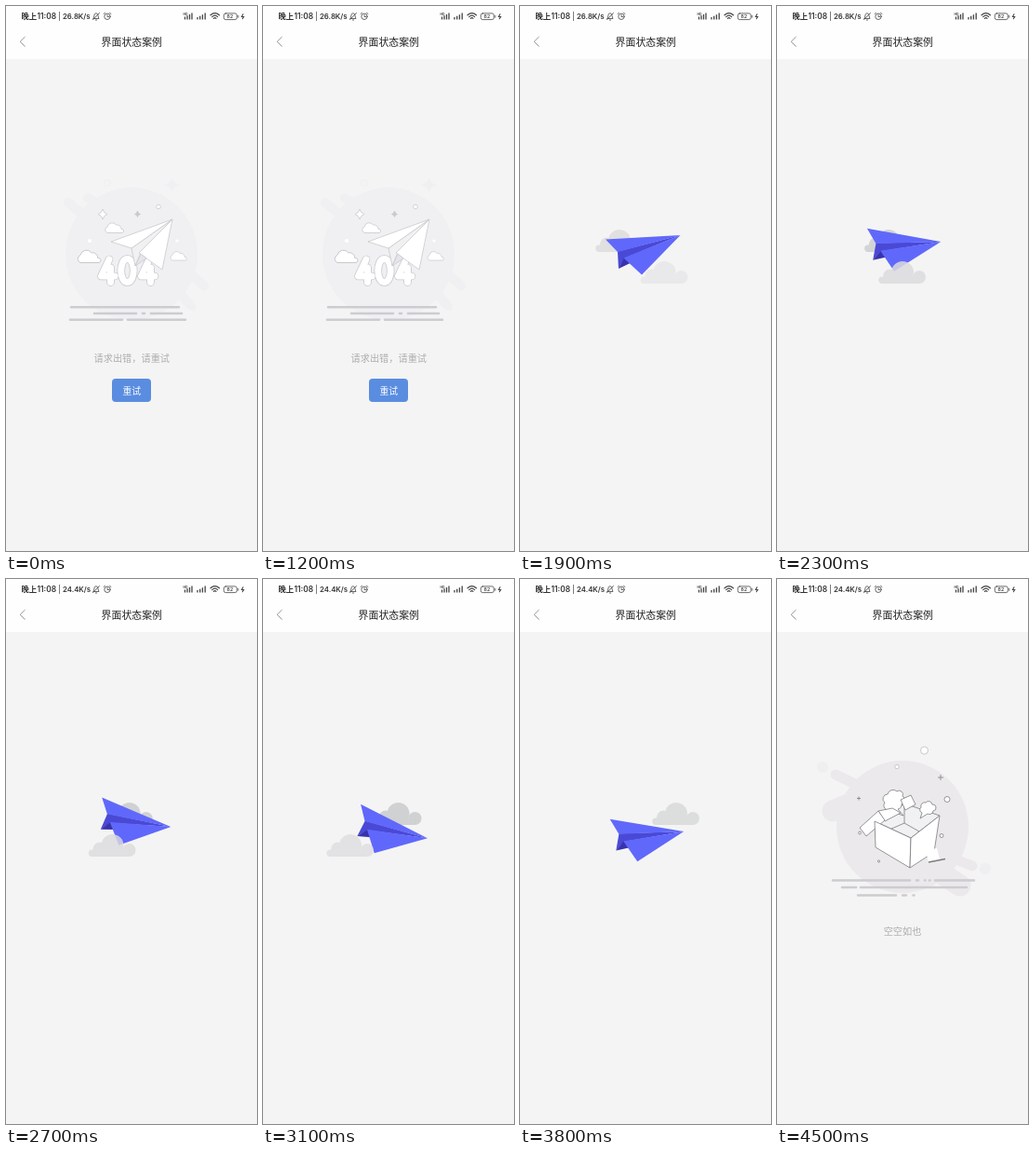
An HTML page for the animation above (4.7 s loop, 270 by 585 pixels).

```html
<!DOCTYPE html>
<html lang="zh-CN">
<head>
<meta charset="utf-8">
<title>界面状态案例</title>
<style>
  html, body { margin: 0; width: 100%; height: 100%; overflow: hidden; background: #f4f4f4; }
  svg { display: block; width: 100vw; height: 100vh; }
  text { font-family: "Noto Sans CJK SC", "Noto Sans CJK", sans-serif; text-anchor: middle; }
  .status text { font-family: Inter, "Noto Sans CJK SC", "Noto Sans CJK", sans-serif; font-size: 8.4px; font-weight: 600; text-anchor: start; fill: #333; }
  .icons { fill: none; stroke: #444; stroke-width: .8; stroke-linecap: round; }
  .note { font-size: 10.2px; fill: #acacac; }
  .ground { stroke: #cdccd0; stroke-width: 2.6; stroke-linecap: round; }
  .shade { fill: #f0eff2; stroke: #f0eff2; stroke-width: 0; stroke-linecap: round; }
  #empty .shade { fill: #ebe9ec; stroke: #ebe9ec; }
  .art { fill: #fff; stroke: #c9c8cc; stroke-width: .8; stroke-linejoin: round; }
  .box { fill: #fff; stroke: #7c7c7f; stroke-width: .8; stroke-linejoin: round; }
</style>
</head>
<body>
<svg viewBox="0 0 270 585" preserveAspectRatio="none">
  <defs>
    <g id="cloud">
      <circle cy="-12" r="12"/><circle cx="18" cy="-7" r="7"/>
      <circle cx="-13.5" cy="-8" r="7.5"/><circle cx="-22" cy="-3.7" r="3.7"/>
      <rect x="-22" y="-7" width="40" height="7"/>
    </g>
    <path id="puff" d="M-8 4a3.5 3.5 0 0 1 0-6.500a5.300 5.300 0 0 1 9.500-2a4.500 4.500 0 0 1 5.500 4.500a2 2 0 0 1 1 4z"/>
    <path id="digits" d="M111 272L102.500 290H117M112.500 281V296.500M154 272L145.500 290H160M155.500 281V296.500M130.500 271.500c-9 0-9 25 0 25s9-25 0-25z"
      fill="none" stroke-linecap="round" stroke-linejoin="round"/>
  </defs>

  <g id="error">
    <g class="shade">
      <circle cx="135" cy="266" r="71"/>
      <path d="M67 211L88 228M88 206L110 219M190 280L213 300M182 302L197 320" stroke-width="10"/>
      <path d="M178.500 184q1.500 6.500 9 8q-7.500 1.500-9 8q-1.500-6.500-9-8q7.500-1.500 9-8z"/>
      <circle cx="200" cy="323" r="4"/>
      <circle cx="109" cy="190" r="3.500" fill="none" stroke-width="1"/>
    </g>
    <g class="art">
      <path d="M104 218q1 4.500 5 5.500q-4 1-5 5.500q-1-4.500-5-5.500q4-1 5-5.500z"/>
      <path d="M141.500 220q.5 3 3 3.500q-2.500.5-3 3q-.5-2.500-3-3q2.500-.5 3-3.500z" fill="#c9c8cc"/>
      <circle cx="164" cy="215.500" r="2.300"/>
      <circle cx="90" cy="252" r="2" stroke="none"/>
      <circle cx="184" cy="252" r="1.500" stroke="none"/>
      <use href="#puff" x="117" y="239.500"/>
      <use href="#puff" transform="translate(90 270.500) scale(1.250)"/>
      <use href="#puff" transform="translate(186 269.500) scale(.88)"/>
      <use href="#digits" stroke="#c9c8cc" stroke-width="8.600"/>
      <use href="#digits" stroke="#fff" stroke-width="7"/>
      <path d="M179 229L135 260L139 279L145 265Z" fill="#f1f0f3"/>
      <path d="M179 229L113 253L135 260Z"/>
      <path d="M179 229L143 265L168 283Z"/>
      <path d="M145 266L139 279L151 271Z" fill="#e6e5e9"/>
    </g>
    <path class="ground" d="M70 323.300H186M95 330H140M147 330H149M156 330H189M69 336.800H125M131 336.800H193"/>
    <text class="note" x="135.300" y="382">请求出错，请重试</text>
    <rect x="114" y="400" width="42" height="25" rx="4" fill="#5a8de0"/>
    <text x="135.300" y="416.600" font-size="9.800" font-weight="500" fill="#fff">重试</text>
  </g>

  <g id="loading">
    <use id="back" href="#cloud" fill="#d0d1d2"/>
    <g id="plane">
      <path d="M105 263.500L172.500 246L112 271L106 282Z" fill="#4a49d6"/>
      <path d="M106 282L112 270L119.500 275.500Z" fill="#3932ad"/>
      <path d="M92 250.500L172.500 246L105 264Z" fill="#6068fb"/>
      <path d="M111.500 270.500L172.500 246L131 288.500Z" fill="#6068fb"/>
    </g>
    <use id="front" href="#cloud" fill="#dcdbde"/>
  </g>

  <g id="empty">
    <g class="shade">
      <circle cx="135" cy="266" r="71"/>
      <circle cx="49" cy="202" r="6" opacity=".6"/>
      <circle cx="224" cy="311" r="6" opacity=".6"/>
      <path d="M63 210L96 226M190 300L210 308" stroke-width="11"/>
      <path d="M60 249L82 240M180 318L197 329" stroke-width="23"/>
    </g>
    <path class="ground" d="M60 323.500H143M150 323.500H152M159 323.500H159.500M164 323.500H164.500M170 323.500H212M70 331H85M90 331H204M87 339.500H128M135 339.500H139M146.500 339.500H147.500"/>
    <g class="box">
      <path d="M105 260L137 241L175 254L144 278Z" fill="#f1f0f2"/>
      <path d="M137 241V262L121 269M137 262L153 271" fill="none"/>
      <path d="M119 248a5 5 0 0 1-3-8a5 5 0 0 1 3-9a6 6 0 0 1 10-3a4 4 0 0 1 6 5a5 5 0 0 1-1 9a5 5 0 0 1-4 5l6 7z"/>
      <path d="M154 257l2-6a3.500 3.500 0 0 1-1-6a4 4 0 0 1 5-5a4 4 0 0 1 7 2a3.500 3.500 0 0 1 1 7a4 4 0 0 1-6 3z"/>
      <path d="M133 237L144 232L149 242L138 248Z"/>
      <path d="M109 249L124 246L133 251L116 260Z"/>
      <path d="M89 267L109 249L116 259L96 276Z"/>
      <path d="M105 260L144 278L143 310L106 288Z"/>
      <path d="M144 278L175 254L169 293L143 310Z"/>
      <path d="M160 291L172 289L175 301L163 304Z" stroke="none"/>
      <path d="M163 304L181 300.500" stroke-width="1.300"/>
      <path d="M176 210V216M173 213H179M88 233.500V237.500M86 235.500H90"/>
      <circle cx="183" cy="236.500" r="3"/>
      <circle cx="177" cy="275.500" r="2"/>
      <circle cx="89" cy="272.500" r="1.400"/>
      <circle cx="109.500" cy="303" r="1.100"/>
      <g stroke="#bbb"><circle cx="158.500" cy="184" r="4"/><circle cx="129" cy="201.500" r="2.200"/></g>
    </g>
    <text class="note" x="135" y="382">空空如也</text>
  </g>

  <rect width="270" height="57" fill="#fefefe"/>
  <g class="status">
    <text x="16.500" y="14.300">晚上</text>
    <text x="33.500" y="14.300">11:08</text>
    <text x="56" y="13.600" style="font-weight:400">|</text>
    <text id="speed" x="61" y="14.300" style="font-size:7.800px"></text>
    <g class="icons">
      <path d="M94 13.500H100C98.700 12 99.700 8 97 7.800S95.300 12 94 13.500M96.300 15H97.700M93.500 14.700L100.500 7.500"/>
      <circle cx="109" cy="11.300" r="3.200"/>
      <path d="M109 9.700V11.500H110.500M105 8.500L106.500 7.300M113 8.500L111.500 7.300"/>
      <path d="M192.500 14.500V11.500M195 14.500V10.300M197.500 14.500V9M200 14.500V7.500M206 14.500V12M208.700 14.500V10.700M211.400 14.500V9.200M214.200 14.500V7.500" stroke-width="1.300" stroke-linecap="butt"/>
      <path d="M220 9.800Q224.700 5.400 229.400 9.800M221.700 11.600Q224.700 8.800 227.700 11.600M223.400 13.400Q224.700 12 226 13.400" stroke-width="1.200"/>
      <rect x="234.300" y="7.900" width="14" height="6.700" rx="2"/>
      <path d="M249.800 10.300V12.300"/>
      <path d="M255 8.800L253.500 11.500H255.700L254.300 13.700" stroke-width="1.100"/>
    </g>
    <text x="190.500" y="9.800" style="font-size:3.500px">HD</text>
    <text x="237.600" y="13.200" style="font-size:5.300px;font-weight:500">82</text>
  </g>
  <path d="M20.500 33L15.200 38.300L20.500 43.600" fill="none" stroke="#777" stroke-width=".8"/>
  <text x="135.300" y="42.500" font-size="10.900" font-weight="500" fill="#222">界面状态案例</text>
</svg>
<script>
const LOOP = 4700, FRAME = 100, FADE = 400;
const el = id => document.getElementById(id);
const clamp = v => Math.min(1, Math.max(0, v));
const fade = (t, start) => .5 - .5 * Math.cos(Math.PI * clamp((t - start) / FADE));

// time, centre x, centre y, pitch
const flight = [
  [0, 132.5, 274, -3], [350, 132, 268, -7], [700, 131.7, 261.3, -2.9],
  [1100, 133, 258.5, 10.5], [1500, 134, 261.7, 23.4], [1900, 134, 271, 27.2],
  [2600, 133, 277, 9.9], [3000, 132.5, 274, -3]
];
const backAlpha = [[0, 0], [300, 0], [700, .55], [1200, 1], [2100, 1], [2600, .65], [3000, 0]];
const frontAlpha = [[0, 0], [300, 0], [700, .45], [1100, .85], [1500, .82], [1900, .72], [2500, 0], [3000, 0]];

function segment(keys, u) {
  let i = 0;
  while (i < keys.length - 2 && u >= keys[i + 1][0]) i++;
  return [i, clamp((u - keys[i][0]) / (keys[i + 1][0] - keys[i][0]))];
}
function linear(keys, u) {
  const [i, p] = segment(keys, u);
  return keys[i][1] + (keys[i + 1][1] - keys[i][1]) * p;
}
// smooth curve through the keys
function spline(keys, u, col) {
  const [i, p] = segment(keys, u);
  const slope = k => {
    const a = keys[Math.max(0, k - 1)], b = keys[Math.min(keys.length - 1, k + 1)];
    return (b[col] - a[col]) / (b[0] - a[0]);
  };
  const a = keys[i], b = keys[i + 1], span = b[0] - a[0], q = 1 - p;
  return a[col] * (1 + 2 * p) * q * q + b[col] * p * p * (3 - 2 * p)
    + span * p * q * (slope(i) * q - slope(i + 1) * p);
}
function place(id, x, y, alpha) {
  el(id).setAttribute('transform', `translate(${x} ${y})`);
  el(id).style.opacity = alpha;
}

function draw(t) {
  const first = fade(t, 200) - fade(t, 800);
  const second = fade(t, 1200) - fade(t, 3800);
  const empty = fade(t, 3800);
  el('error').style.opacity = clamp(1 - first - second - empty);
  el('loading').style.opacity = clamp(first + second);
  el('empty').style.opacity = empty;
  el('speed').textContent = t < 2400 ? '26.8K/s' : '24.4K/s';

  const u = Math.max(0, t < 1200 ? t - 200 : t - 1200);
  const [x, y, pitch] = [1, 2, 3].map(col => spline(flight, u, col));
  el('plane').setAttribute('transform',
    `translate(${x} ${y}) rotate(${pitch + 2.9}) translate(-131.7 -261.3)`);
  place('back', 107 + .0321 * (u - 700), 264, linear(backAlpha, u));
  place('front', 155.5 - .0512 * (u - 700), 298, linear(frontAlpha, u));
}

const start = performance.now();
function tick() {
  const t = (performance.now() - start) % LOOP;
  draw(Math.floor(t / FRAME) * FRAME);
  requestAnimationFrame(tick);
}
tick();
</script>
</body>
</html>
```
